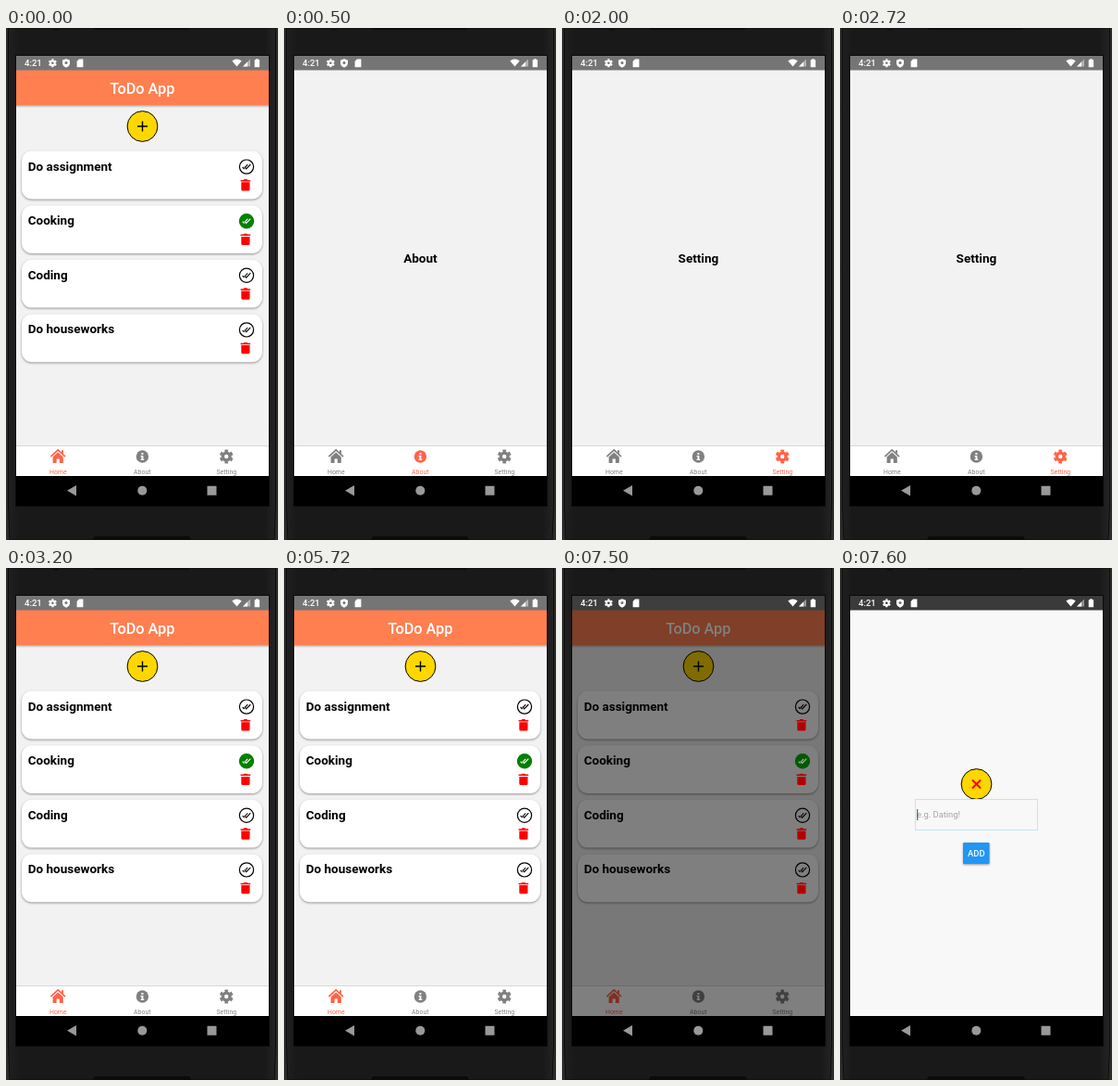
Animation of 294x552 px, one loop 8 s. Source, as an HTML page:

```html
<!DOCTYPE html>
<html lang="en">
<head>
<meta charset="utf-8">
<title>ToDo App</title>
<style>
html, body { margin: 0; width: 100%; height: 100%; overflow: hidden; background: #1c1c1c; }
svg { display: block; width: 294px; height: 552px; font-family: Roboto, sans-serif; }
.mid { text-anchor: middle; }
.head { font-size: 13.5px; font-weight: 700; }
.tab { color: #808080; }
.tab.on { color: #ff6347; }
.tab text { font-size: 6.9px; fill: currentColor; }
.card { fill: #fff; filter: drop-shadow(0 1.2px 1.2px #0006); }
.line { fill: none; stroke: currentColor; }
</style>
</head>
<body>
<svg viewBox="0 0 294 552">
  <defs>
    <linearGradient id="body">
      <stop offset="0" stop-color="#202020"/><stop offset=".04" stop-color="#191919"/>
      <stop offset=".96" stop-color="#191919"/><stop offset="1" stop-color="#242424"/>
    </linearGradient>
    <linearGradient id="shade" x2="0" y2="1">
      <stop stop-color="#000" stop-opacity=".3"/><stop offset="1" stop-color="#000" stop-opacity="0"/>
    </linearGradient>
  </defs>

  <rect width="294" height="552" fill="#2c2c2c"/>
  <path d="M2.5 0H291.5V515L290 552H4L2.5 515Z" fill="url(#body)" stroke="#0c0c0c"/>
  <path d="M93 -1H200L197 2H96ZM93 553L96 548H198L201 553Z" fill="#0b0b0b"/>
  <circle cx="54" cy="-1" r="4" fill="#101010"/>
  <rect x="10" y="29" width="275" height="487" fill="#0a0a0a"/>
  <rect x="11" y="45" width="273" height="438" fill="#f2f2f2"/>

  <g id="home">
    <rect x="11" y="83" width="273" height="3" fill="url(#shade)"/>
    <rect x="11" y="45" width="273" height="38" fill="#ff7f50"/>
    <text class="mid" x="147.3" y="71" font-size="16.3" font-weight="500" fill="#fff">ToDo App</text>
    <circle cx="147.5" cy="106" r="16.4" fill="gold" stroke="#000"/>
    <path d="M142 106h11M147.5 100.5v11" stroke="#000" stroke-width="1.4"/>
    <g id="cards"></g>
  </g>
  <text id="page" class="mid head" x="147.4" y="253"></text>

  <rect x="11" y="450" width="273" height="33" fill="#fff"/>
  <path d="M11 450.5H284" stroke="#d8d8d8"/>
  <g id="tabs"></g>
  <rect id="dim" x="11" y="45" width="273" height="438"/>
  <g id="marks"></g>

  <g id="modal">
    <rect x="11" y="45" width="273" height="438" fill="#f8f8f8"/>
    <circle cx="147.5" cy="233" r="16.4" fill="gold" stroke="#000"/>
    <path d="M143 228.5l9 9m0 -9l-9 9" stroke="red" stroke-width="2"/>
    <rect x="81.5" y="249.5" width="132" height="33" fill="none" stroke="#bfe6f3"/>
    <text x="83" y="269" font-size="9.4" fill="#a3a3a3">e.g. Dating!</text>
    <path d="M83.7 260v12" stroke="#1f5a50"/>
    <rect x="133" y="296" width="28.5" height="23" rx="1.3" fill="#2196f3" style="filter:drop-shadow(0 1px 1px #0006)"/>
    <text class="mid" x="147.3" y="311" font-size="9.4" font-weight="500" fill="#fff">ADD</text>
  </g>

  <rect id="status" x="11" y="30" width="273" height="15.5"/>
  <g fill="#fff" color="#fff">
    <text x="20" y="41.2" font-size="9.5" font-weight="500">4:21</text>
    <g id="cog"></g>
    <path d="M65 33.2l4 1.5v3q0 3.3 -4 5q-4 -1.7 -4 -5v-3z"/>
    <path d="M79 33.4h4.4v8.8h-6.8v-6.3z"/>
    <path d="M244.3 35.6q5.2 -4 10.4 0l-5.2 6z"/>
    <path d="M264 33.6v8h-8z" opacity=".45"/>
    <path d="M261 36.6v5h-5z"/>
    <path d="M270.3 33.2h2.2v1h1.6v8h-5.4v-8h1.6z"/>
  </g>
  <circle cx="65" cy="37.6" r="1.5" fill="#757575"/>

  <rect x="11" y="483" width="273" height="32"/>
  <g fill="#999">
    <path d="M66 498.7L76 493v11.4z"/>
    <circle cx="147.3" cy="498.7" r="5"/>
    <rect x="217.5" y="493.8" width="10" height="10" rx=".6"/>
  </g>
</svg>
<script>
const $ = id => document.getElementById(id);
const show = (id, on) => $(id).style.display = on ? "" : "none";

const gear = (x, y, s) => `<g class="line" transform="translate(${x} ${y}) scale(${s})">
  <circle r="3.9" stroke-width="3.4"/>
  <circle r="6.2" stroke-width="2.6" pathLength="360" stroke-dasharray="34 26" transform="rotate(13)"/></g>`;

const icons = [
  `<path class="line" d="M48.4 462.2L56.2 455l7.8 7.2" stroke-width="1.7"/>
   <path fill="currentColor" d="M50.6 462.4l5.6 -5 5.6 5v6.6h-4v-4.4h-3.2v4.4h-4zM60 455.2h2v4l-2 -1.8z"/>`,
  `<circle cx="147.4" cy="462" r="6.7" fill="currentColor"/>
   <path d="M146.4 458.1h2v1.8h-2zM145.6 461h2.8v3.8h.8v1.2h-3.6v-1.2h.9v-2.6h-.9z" fill="#fff"/>`,
  gear(238.2, 462, 1)
];
const names = ["Home", "About", "Setting"];
$("tabs").innerHTML = names.map((name, i) =>
  `<g class="tab">${icons[i]}<text class="mid" x="${56.3 + 91 * i}" y="481">${name}</text></g>`).join("");
$("cog").innerHTML = gear(50.4, 37.8, .6);

const check = (y, done) => `<circle cx="260" cy="${y}" r="7.6" fill="${done ? "green" : "#fff"}"
    stroke="${done ? "green" : "#000"}" stroke-width="1.2"/>
  <path d="M255.6 ${y + .4}l2 2 M257.7 ${y + .1}l2 2.2 4.6 -4.9 M258.8 ${y + .2}l2.4 -2.6"
    fill="none" stroke="${done ? "#fff" : "#000"}" stroke-width="1.1"/>`;
const trash = y => `<path fill="red" d="M253.6 ${y + 1}h3l.8 -.9h3l.8 .9h3v1.5h-10.6z
  M254.3 ${y + 3.3}h9.2v7.7q0 1.5 -1.5 1.5h-6.2q-1.5 0 -1.5 -1.5z"/>`;

["Do assignment", "Cooking", "Coding", "Do houseworks"].forEach((task, i) => {
  const y = 132.6 + 58.6 * i, done = i === 1;
  $("cards").innerHTML += `<rect class="card" x="17" y="${y}" width="260" height="51.8" rx="11"/>
    <text class="head" x="23.7" y="${y + 20.9}">${task}</text>` + (done ? "" : check(y + 17, false));
  $("marks").innerHTML += trash(y + 30.4) + (done ? check(y + 17, true) : "");
});

// start time, active tab, dimming, status bar colour, modal open
const steps = [
  [0, 0, 0, "#757575"],
  [500, 1, 0, "#757575"],
  [2000, 2, 0, "#757575"],
  [3200, 0, 0, "#757575"],
  [7400, 0, .1, "#6a6a6a"],
  [7500, 0, .5, "#3e3e3e"],
  [7600, 0, .5, "#3a3a3a", true]
];
const tabs = document.querySelectorAll(".tab");

function draw(now) {
  const t = now % 8000;
  const [, tab, dim, bar, modal] = steps.filter(s => s[0] <= t).pop();
  tabs.forEach((el, i) => el.classList.toggle("on", i === tab));
  show("home", tab === 0);
  show("marks", tab === 0);
  show("modal", modal);
  $("page").textContent = tab ? names[tab] : "";
  $("dim").style.opacity = dim;
  $("marks").style.filter = dim ? `brightness(${1 - dim * .6})` : "";
  $("status").style.fill = bar;
}

const start = performance.now();
function loop() {
  draw(performance.now() - start);
  requestAnimationFrame(loop);
}
loop();
</script>
</body>
</html>
```
